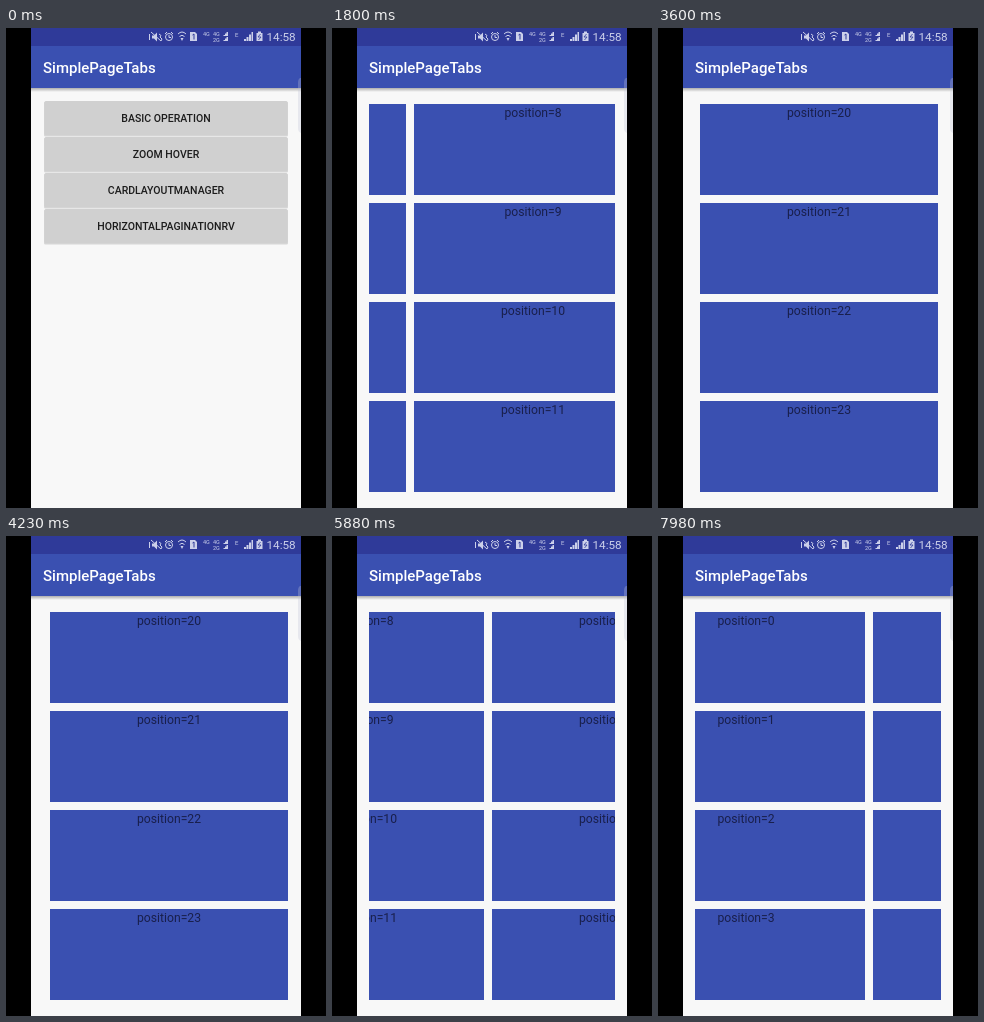
An HTML page for the animation above (8000 ms loop, 320 by 480 pixels).

```html
<!DOCTYPE html>
<html lang="en">
<head>
<meta charset="utf-8">
<title>Paged cards</title>
<style>
  html, body { margin: 0; width: 100%; height: 100%; overflow: hidden; background: #000; }
  svg { display: block; width: 100vw; height: 100vh; font-family: Roboto, sans-serif; }
  .button { fill: #d0d0d0; }
  .shade { fill: #000; opacity: .14; }
  .label { font-size: 10.5px; font-weight: 500; text-anchor: middle; fill: #1c1c1c; }
  .card { fill: #3a50b1; }
  .position { font-size: 12.2px; text-anchor: middle; fill: #191f4b; }
  .status { fill: #ccd0ea; }
  .line { fill: none; stroke: #ccd0ea; }
</style>
</head>
<body>
<svg viewBox="0 0 320 480">
  <defs>
    <clipPath id="viewport"><rect x="37" y="64" width="246" height="412"/></clipPath>
    <linearGradient id="shadow" x2="0" y2="1">
      <stop stop-color="#000" stop-opacity=".3"/>
      <stop offset="1" stop-color="#000" stop-opacity="0"/>
    </linearGradient>
  </defs>
  <rect x="25" width="270" height="480" fill="#f8f8f8"/>
  <g id="menu"></g>
  <g id="pager" clip-path="url(#viewport)"><g id="track"></g></g>

  <rect x="25" y="18" width="270" height="42" fill="#3a50b1"/>
  <rect x="25" y="60" width="270" height="4" fill="url(#shadow)"/>
  <rect x="25" width="270" height="18" fill="#2f3a99"/>
  <text x="37" y="45" font-size="15" font-weight="500" fill="#fff">SimplePageTabs</text>
  <path d="M295 50h-1q-2 1-2 5v45q0 4 3 5z" fill="#bfc3d8" opacity=".3"/>

  <g class="status">
    <path d="M146 7.500h2l3-3v9l-3-3h-2z"/>
    <path class="line" d="M143.500 6v6M145 4l10 9M153 6l2 1.500-1 1.500 2 2-1 2"/>
    <circle class="line" cx="163" cy="9" r="3.500"/>
    <path class="line" d="M163 7v2.500h2M159 6l2-2M165 4l2 2"/>
    <path class="line" d="M172 6q4-4 8 0M173.500 8.500q2.500-2.500 5 0"/>
    <path d="M174.500 10h3l-1.500 3z"/>
    <path d="M184 4h5l2 2v7h-7z"/>
    <path d="M186.500 7l1.500-1v5.500" fill="none" stroke="#2f3a99"/>
    <text x="197" y="8" font-size="5.500">4G</text>
    <text x="207" y="8" font-size="5.500">4G</text>
    <text x="207" y="13.500" font-size="5.500">2G</text>
    <path d="M216 8h1.500v-1h1.500v-1.500h1.500v-1.500h1.500v4zM216 13h1.500v-1h1.500v-1.500h1.500v-1.500h1.500v4z"/>
    <text x="229" y="8.500" font-size="6">E</text>
    <path d="M238 13v-2h2v2zM240.500 13v-4h2v4zM243 13v-6.500h2v6.500zM245.500 13v-9h1.500v9z"/>
    <path d="M250.500 5h1.500v-1.500h3v1.500h1.500v8h-6z"/>
    <path d="M254.500 6l-2.500 3h3l-2.500 3" fill="none" stroke="#2f3a99" stroke-width=".8"/>
    <text x="260.500" y="13" font-size="11.700">14:58</text>
  </g>
</svg>
<script>
const LOOP = 8000, MENU_END = 400, SWIPE = 500;
const PITCH = 246, CARD_W = 238, CARD_H = 91, FIRST_X = 41;
const LAST_PAGE = 5, ROWS = 4;

// Each swipe: start time and page direction.
const swipes = [
  [870, 1], [1430, 1], [1990, 1], [2555, 1], [3120, 1],
  [4198, -1], [4920, -1], [5637, -1], [6342, -1], [7660, -1]
];

const menu = document.getElementById('menu');
const pager = document.getElementById('pager');
const track = document.getElementById('track');

function add(parent, tag, attributes, text = '') {
  const node = document.createElementNS('http://www.w3.org/2000/svg', tag);
  for (const [name, value] of Object.entries(attributes)) node.setAttribute(name, value);
  node.textContent = text;
  parent.append(node);
}

['BASIC OPERATION', 'ZOOM HOVER', 'CARDLAYOUTMANAGER', 'HORIZONTALPAGINATIONRV'].forEach((label, i) => {
  const y = 73 + i * 36;
  add(menu, 'rect', { class: 'shade', x: 38, y: y + 0.5, width: 244, height: 35, rx: 1.5 });
  add(menu, 'rect', { class: 'button', x: 38.5, y, width: 243, height: 34, rx: 1.5 });
  add(menu, 'text', { class: 'label', x: 160, y: y + 21 }, label);
});

for (let i = 0; i < (LAST_PAGE + 1) * ROWS; i++) {
  const x = FIRST_X + Math.floor(i / ROWS) * PITCH;
  const y = 76 + (i % ROWS) * 99;
  add(track, 'rect', { class: 'card', x, y, width: CARD_W, height: CARD_H });
  add(track, 'text', { class: 'position', x: x + CARD_W / 2, y: y + 12.7 }, `position=${i}`);
}

function ease(u) {
  u = Math.min(1, Math.max(0, u));
  return u * u * (3 - 2 * u);
}

function draw(now) {
  const t = now % LOOP;
  const page = swipes.reduce((sum, [start, step]) => sum + step * ease((t - start) / SWIPE), 0);
  track.setAttribute('transform', `translate(${-Math.round(page * PITCH)} 0)`);
  menu.style.display = t < MENU_END ? '' : 'none';
  pager.style.display = t < MENU_END ? 'none' : '';
}

const begin = performance.now();
function tick() {
  draw(performance.now() - begin);
  requestAnimationFrame(tick);
}
tick();
</script>
</body>
</html>
```
